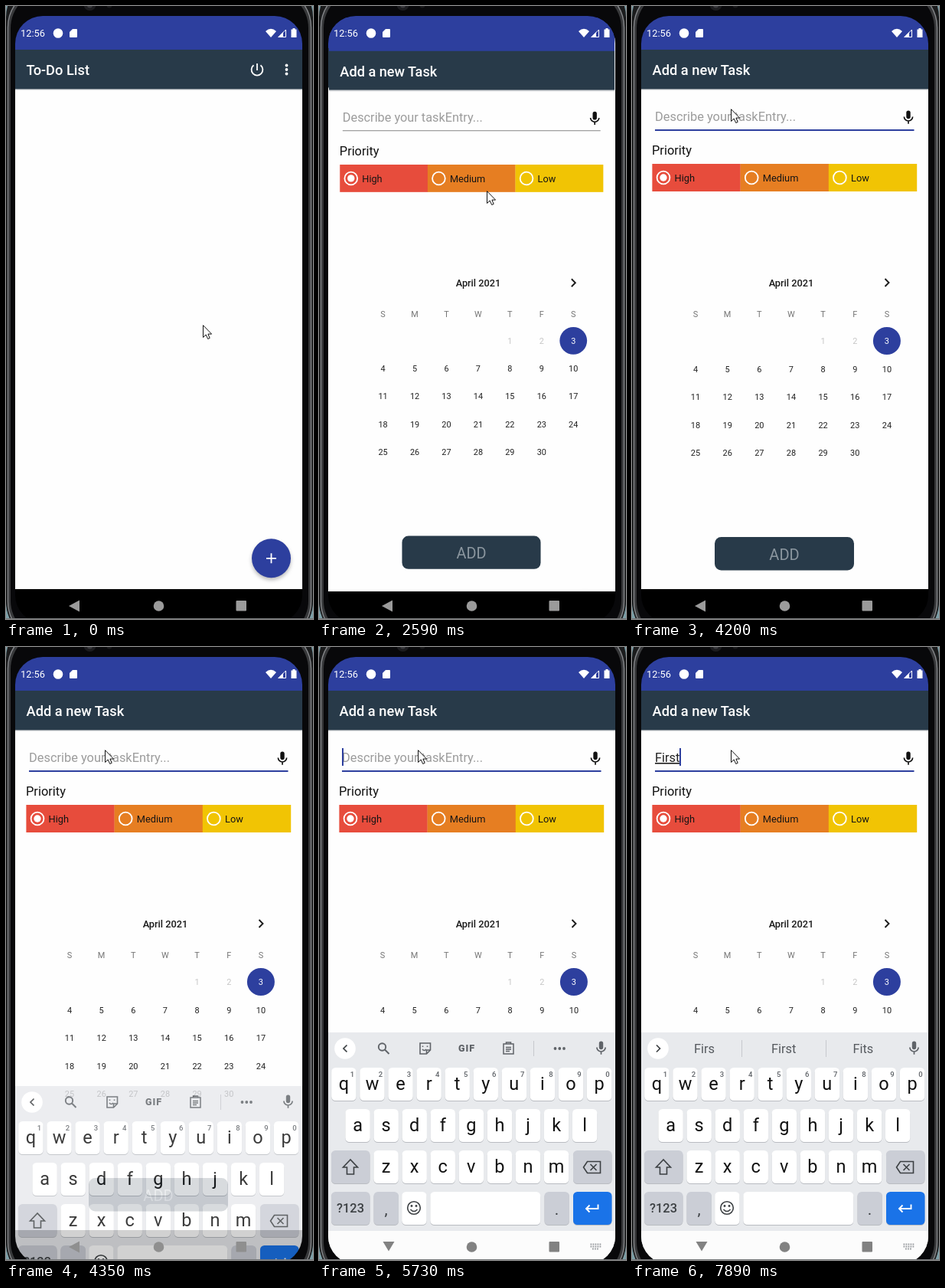
An HTML page that plays this animation: 401x800 px, repeating every 8 s.

```html
<!DOCTYPE html>
<html lang="en">
<head>
<meta charset="utf-8">
<title>To-Do List</title>
<style>
  html, body { margin: 0; width: 100%; height: 100%; overflow: hidden; background: #7d9fa7; }
  svg { display: block; }
  text { font-family: Roboto, "Noto Sans", sans-serif; }
  .mid { text-anchor: middle; }
  .med { font-weight: 500; }
  .line { fill: none; stroke: currentColor; }
  .body { font-size: 16.4px; }
  .small { font-size: 12.8px; }
  .tiny { font-size: 10.95px; }
  #home, #form { transform-origin: 199.5px 409px; }
  #keyboard { color: #5f6368; }
  #letters { font-size: 23.5px; fill: #111; }
  .typed { text-decoration: underline; fill: #212121; }
</style>
</head>
<body>
<svg width="401" height="800" viewBox="0 0 401 800">
  <defs>
    <clipPath id="screen"><rect x="12" y="13" width="375" height="792" rx="36"/></clipPath>
    <g id="mic">
      <rect x="-2.7" y="-9.1" width="5.4" height="10.9" rx="2.7" fill="currentColor"/>
      <path class="line" stroke-width="1.7" d="M-5.6 -.9 a5.6 5.4 0 0 0 11.2 0 M0 4.500 V8.200"/>
    </g>
    <g id="bars">
      <rect x="12" y="13" width="375" height="748" fill="#fefefe"/>
      <rect x="12" y="108" width="375" height="1" fill="#8d959c"/>
      <rect x="12" y="109" width="375" height="1" fill="#dfe1e3"/>
      <rect x="12" y="13" width="375" height="45" fill="#2d3f9e"/>
      <rect x="12" y="57" width="375" height="51" fill="#283a49"/>
    </g>
  </defs>

  <!-- phone body -->
  <rect y="-40" width="401" height="872" rx="55" fill="#1a1b1c"/>
  <rect x="2.5" y="-24" width="396" height="853" rx="52" fill="#38393b" stroke="#85878a" stroke-width="1.4"/>
  <rect x="6" y="-20" width="389" height="845" rx="49" fill="#08080a"/>
  <circle cx="109.5" cy="-2" r="8" fill="#1c1c1f"/>
  <circle cx="109.5" cy="-1" r="3.5" fill="#3a3a3e"/>
  <circle cx="135" cy="-1" r="3.5" fill="#1a1a1c"/>

  <g clip-path="url(#screen)">
    <rect x="12" y="13" width="375" height="792" fill="#000"/>

    <g id="home">
      <use href="#bars"/>
      <text class="med" x="26.5" y="90" font-size="18.25" fill="#fff">To-Do List</text>
      <path class="line" color="#fff" stroke-width="1.8" d="M328 75 V84 M323.5 77.3 a7.4 7.4 0 1 0 9 0"/>
      <g fill="#fff"><circle cx="366.5" cy="77.5" r="1.9"/><circle cx="366.5" cy="83" r="1.9"/><circle cx="366.5" cy="88.5" r="1.9"/></g>
      <g id="fab"><circle cx="346.5" cy="720.8" r="25.5" fill="#2d3f9e"/></g>
      <path d="M340 720.8 H353 M346.5 714.3 V727.3" stroke="#fff" stroke-width="1.8"/>
    </g>

    <g id="form">
      <use href="#bars"/>
      <text class="med" x="26.5" y="90" font-size="18.25" fill="#fff">Add a new Task</text>
      <text id="hint" class="body" x="30" y="150" fill="#9c9c9c">Describe your taskEntry...</text>
      <rect id="idle" x="30" y="161" width="338.5" height="1" fill="#858585"/>
      <rect id="focus" x="30" y="161" width="338.5" height="2" fill="#2d3f9e"/>
      <rect id="caret" x="30" y="132" width="2" height="23" fill="#2d3f9e"/>
      <g id="words"></g>
      <use href="#mic" x="361" y="145.5" color="#111"/>
      <text class="body" x="26" y="194" fill="#111">Priority</text>
      <g id="radios"></g>
      <text class="small med mid" x="208" y="365.5" fill="#1a1a1a">April 2021</text>
      <path class="line" color="#1a1a1a" stroke-width="1.9" d="M330.5 356 L335.5 361 L330.5 366"/>
      <g id="calendar" class="tiny mid"></g>
      <rect x="108" y="693" width="182" height="43.5" rx="8.5" fill="#283a49"/>
      <text class="mid" x="199" y="722.5" font-size="20" fill="#8b969f">ADD</text>
    </g>

    <!-- status icons -->
    <g fill="#fff">
      <text class="small" x="19" y="40">12:56</text>
      <circle cx="68" cy="35.5" r="6.3"/>
      <path d="M87 30 H92 a1 1 0 0 1 1 1 V40 a1 1 0 0 1 -1 1 H84 a1 1 0 0 1 -1 -1 V34 Z"/>
      <path d="M339 33 Q346 26.5 353 33 L346 41 Z"/>
      <path d="M362 34 V41 H355 Z"/>
      <path class="line" color="#fff" d="M365.5 31 V40.5 H356 Z"/>
      <path d="M374.5 29 h3 v1.5 h2 v10.5 h-7 v-10.5 h2 Z"/>
    </g>

    <g id="keyboard">
      <rect x="12" y="503" width="375" height="300" fill="#e8eaed"/>
      <circle cx="34" cy="524" r="13.8" fill="#fff"/>
      <use href="#mic" x="368.5" y="523.5"/>
      <g id="tools">
        <path class="line" color="#3c4043" stroke-width="1.7" d="M36.5 519.5 L32 524 L36.5 528.5"/>
        <g class="line" stroke-width="1.9">
          <circle cx="82.5" cy="522" r="4.7"/><path d="M86 525.5 L91.5 531"/>
          <path d="M132 517 H145.5 V526 L140.5 531 H132 Z M145.5 526 H140.5 V531 M135 525 q2.5 3 5 0 M135.5 520.5 v1.5 M141.5 520.5 v1.5" stroke-width="1.6"/>
          <path d="M241 518 H254 V531 H241 Z M244.5 518 h6 v-2 h-6 Z M244 522.5 h7 M244 525 h7 M244 527.5 h5" stroke-width="1.5"/>
        </g>
        <text class="mid" x="193" y="528.3" font-size="12.5" font-weight="900" letter-spacing="1" fill="#5f6368">GIF</text>
        <rect x="280" y="514" width="1" height="20" fill="#c6c9cd"/>
        <g fill="#5f6368"><circle cx="308.5" cy="524" r="1.9"/><circle cx="314.3" cy="524" r="1.9"/><circle cx="320" cy="524" r="1.9"/></g>
      </g>
      <g id="strip">
        <path class="line" color="#3c4043" stroke-width="1.7" d="M32 519.5 L36.5 524 L32 528.5"/>
        <path d="M143.5 513 V535 M253.5 513 V535" stroke="#c6c9cd"/>
      </g>
      <g id="guesses" class="body mid" fill="#55595e"></g>
      <g id="keys"></g>
      <g id="letters" class="mid"></g>
      <g id="digits" class="mid med" font-size="9.5" fill="#5f6368"></g>
      <g class="line" color="#3c4043" stroke-width="1.6">
        <path id="shift" d="M41 669 L31.5 679 H36.5 V688 H45.5 V679 H50.5 Z"/>
        <path d="M345.5 679 L350.5 671.5 H367.5 V686.5 H350.5 Z M354.5 675 L362.5 683 M362.5 675 L354.5 683"/>
        <circle cx="124" cy="732" r="8.3"/>
        <path d="M119.5 734 q4.5 5 9 0"/>
      </g>
      <g fill="#3c4043">
        <circle cx="121" cy="729.5" r="1.4"/><circle cx="127" cy="729.5" r="1.4"/>
        <text class="mid med" x="41" y="738" font-size="16.4">?123</text>
        <text class="mid" x="87.5" y="741" font-size="21">,</text>
        <text class="mid" x="310.5" y="741" font-size="21">.</text>
      </g>
      <path class="line" color="#fff" stroke-width="1.9" d="M364.5 727.5 V733 H349 M353.5 728.5 L349 733 L353.5 737.5"/>
    </g>

    <!-- navigation bar, stays above the keyboard -->
    <g id="light">
      <rect x="12" y="762" width="375" height="43" fill="#fcfcfc"/>
      <path d="M354.5 779.5 H368.5 M354.5 782.5 H368.5 M357 785.5 H366" stroke="#9a9da1" stroke-width="1.8" stroke-dasharray="1.8 1.2"/>
    </g>
    <g id="nav">
      <path id="back" d="M82 783 L96 775.5 V790.5 Z"/>
      <path id="down" d="M83.5 776 H98.5 L91 788.5 Z"/>
      <circle cx="199.5" cy="783" r="6.8"/>
      <rect x="300.5" y="776" width="13.5" height="13.5" rx="1"/>
    </g>
  </g>

  <rect y="799" width="401" height="1" fill="#77797b"/>
  <path id="cursor" d="M.5 .7 V16.5 L4.2 13 L6.7 18.5 L9.2 17.4 L6.9 12.1 H11.6 Z" fill="#fff" stroke="#111"/>
</svg>

<script>
const LOOP = 8000;
const $ = id => document.getElementById(id);
const add = (id, markup) => $(id).insertAdjacentHTML("beforeend", markup);
const css = document.head.appendChild(document.createElement("style"));

// Held poses: { startMs: "declarations" }
function track(id, poses) {
  const frames = Object.entries(poses).map(([ms, rule]) => `${ms / LOOP * 100}%{${rule}}`);
  css.append(`@keyframes k-${id}{${frames.join("")}}
#${id}{animation:k-${id} ${LOOP}ms step-end infinite}\n`);
}

// Starts hidden unless the first time is 0, then flips at every listed time
function toggle(id, ...times) {
  const poses = { 0: "visibility:hidden" };
  times.forEach((ms, i) => poses[ms] = "visibility:" + (i % 2 ? "hidden" : "visible"));
  track(id, poses);
}

// ---- form ----
const COL = 115.2;
["High", "Medium", "Low"].forEach((label, i) => {
  const x = 26.4 + i * COL, fill = ["#e74c3c", "#e67e22", "#f1c404"][i];
  add("radios", `<rect x="${x}" y="206" width="${COL + .2}" height="36" fill="${fill}"/>
    <circle cx="${x + 14.6}" cy="224" r="8.4" fill="none" stroke="#fff" stroke-width="1.8"/>
    ${i ? "" : `<circle cx="${x + 14.6}" cy="224" r="4.7" fill="#fff"/>`}
    <text class="small" x="${x + 29.2}" y="228.7" fill="#151515">${label}</text>`);
});

const dayX = i => 83 + 41.65 * i;
[..."SMTWTFS"].forEach((d, i) =>
  add("calendar", `<text x="${dayX(i)}" y="406.3" fill="#757575">${d}</text>`));
add("calendar", `<circle cx="${dayX(6)}" cy="437" r="18" fill="#2d3f9e"/>`);
for (let day = 1; day <= 30; day++) {
  const cell = day + 3, y = 441 + 36.5 * Math.floor(cell / 7);
  const fill = day < 3 ? "#c6c6c6" : day === 3 ? "#fff" : "#212121";
  add("calendar", `<text x="${dayX(cell % 7)}" y="${y}" fill="${fill}">${day}</text>`);
}

// ---- keyboard ----
const PITCH = 37.07, ROW = 54, GREY = "#cbced6";
function key(x, row, width = 32.4, fill = "#fff") {
  const y = 549 + row * ROW;
  add("keys", `<rect x="${x}" y="${y + 1}" width="${width}" height="43" rx="5.5" fill="#b9bcc1"/>
    <rect x="${x}" y="${y}" width="${width}" height="43" rx="5.5" fill="${fill}"/>`);
}
["qwertyuiop", "asdfghjkl", "zxcvbnm"].forEach((letters, row) => {
  [...letters].forEach((c, i) => {
    const x = [32.4, 50.6, 87.6][row] + i * PITCH;
    key(x - 16.2, row);
    add("letters", `<text x="${x}" y="${577.7 + row * ROW}">${c}</text>`);
    if (!row) add("digits", `<text x="${x + 11}" y="560.5">${(i + 1) % 10}</text>`);
  });
});
key(16, 2, 50.5, GREY);
key(332, 2, 50.5, GREY);
key(16, 3, 50.5, GREY);
key(71.5, 3, 32.4, GREY);
key(108.2, 3);
key(145.3, 3, 144);
key(294.5, 3, 32.4, GREY);
key(332, 3, 50.5, "#1a73e8");

// ---- typing: start, text, caret x, suggestions ----
const typing = [
  [7210, "F", 39, "For F From"],
  [7490, "Fi", 43, "Fire Fi Find"],
  [7610, "Fir", 48.5, "Fire Fir First"],
  [7890, "First", 62, "Firs First Fits"]
];
typing.forEach(([ms, text, x, guesses], i) => {
  const end = i < typing.length - 1 ? [typing[i + 1][0]] : [];
  add("words", `<g id="word${i}"><text class="body typed" x="30" y="150">${text}</text>
    <rect x="${x}" y="132" width="2" height="23" fill="#2d3f9e"/></g>`);
  add("guesses", `<g id="guess${i}">${guesses.split(" ").map((g, n) =>
    `<text x="${94.5 + n * 103.7}" y="530">${g}</text>`).join("")}</g>`);
  toggle("word" + i, ms, ...end);
  toggle("guess" + i, ms, ...end);
});

// ---- timeline ----
const path = [
  [0, 257, 416], [150, 276, 468], [270, 311, 580], [390, 335, 662], [510, 347, 702], [660, 349, 716],
  [1220, 346, 706], [1340, 321, 623], [1490, 279, 480], [1610, 234, 310], [1730, 214, 238], [2290, 219, 241],
  [2980, 176, 199], [3100, 140, 161], [3250, 127, 134], [3400, 126, 134], [3670, 129, 134]
];
track("cursor", Object.fromEntries(path.map(([ms, x, y]) => [ms, `transform:translate(${x}px,${y}px)`])));

track("fab", {
  0: "filter:drop-shadow(0 3px 2.5px #0004)",
  1220: "filter:drop-shadow(0 5px 3.5px #0004)"
});
track("home", {
  0: "transform:scale(1);visibility:visible",
  2440: "transform:scale(1.006);visibility:visible",
  2710: "transform:scale(1);visibility:hidden"
});
track("form", {
  0: "transform:scale(.995);visibility:hidden",
  2590: "transform:scale(.995);visibility:visible",
  2710: "transform:scale(1);visibility:visible"
});
toggle("hint", 2590, 7210);
toggle("idle", 2590, 3400);
toggle("focus", 3400);
toggle("caret", 3520, 4200, 4740, 5170, 5730, 6130, 6660, 7210);

const slide = (y, alpha) => `transform:translateY(${y}px);opacity:${alpha}`;
track("keyboard", {
  0: slide(300, 0), 4350: slide(70, .82), 4500: slide(20, .97), 4620: slide(4, 1), 4740: slide(0, 1)
});
toggle("light", 4500);
toggle("back", 0, 4500);
toggle("down", 4500);
track("nav", { 0: "fill:#9b9b9b", 4350: "fill:#8f8f8f", 4500: "fill:#828282" });
toggle("tools", 0, 7210);
toggle("strip", 7210);
track("letters", { 0: "text-transform:none", 7090: "text-transform:uppercase", 7210: "text-transform:none" });
track("shift", { 0: "fill:none", 7090: "fill:#3c4043", 7210: "fill:none" });
</script>
</body>
</html>
```
